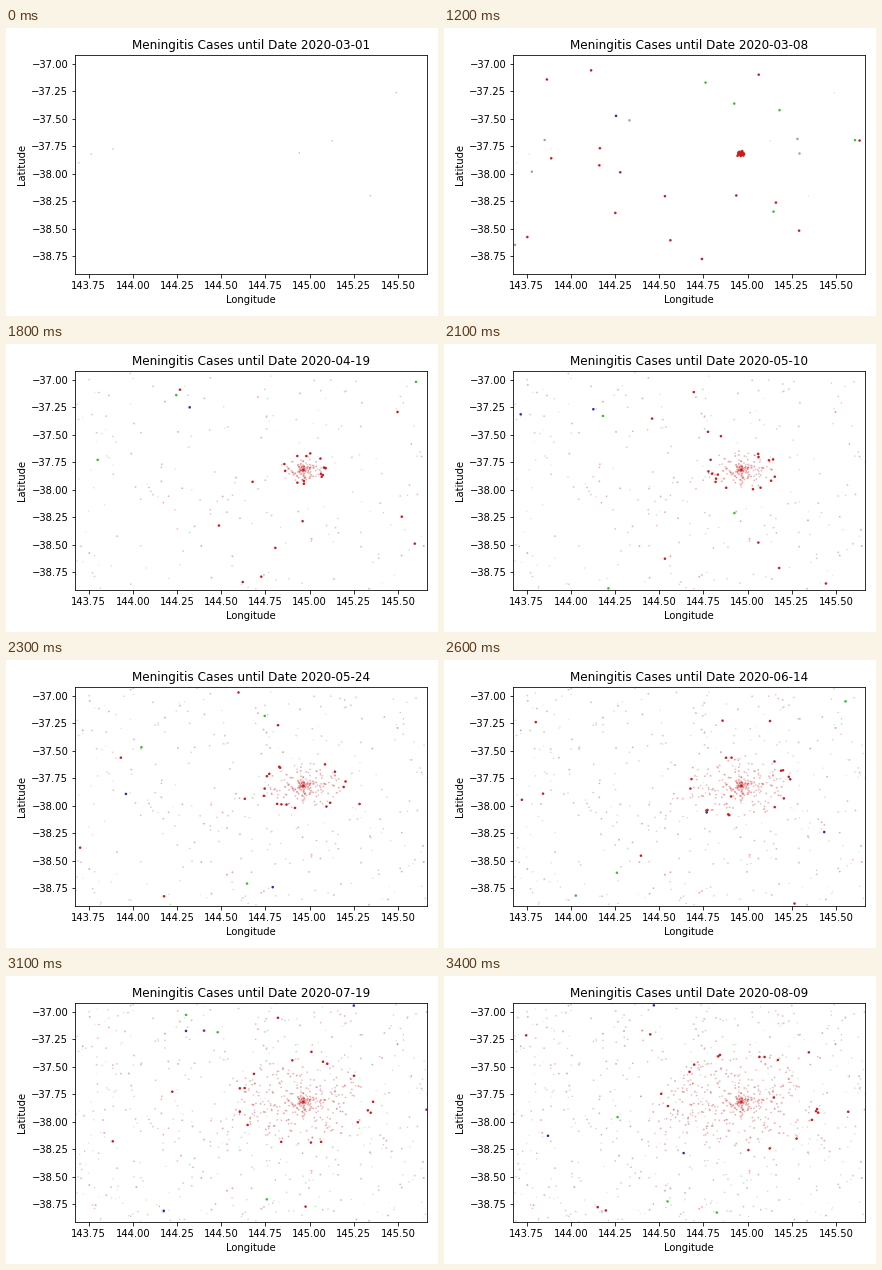
A matplotlib script that plays this animation: 432 px wide and 288 px high, repeating every 4.5 s.

```python
import numpy as np
import matplotlib.pyplot as plt
from matplotlib.animation import FuncAnimation
from matplotlib.colors import to_rgb

W, H, DPI = 432, 288, 72
LEFT, RIGHT, TOP, BOTTOM = 69.3, 421.2, 27.2, 246.2
LON = (143.675, 145.665)
LAT = (-38.914, -36.921)
CITY = (144.963, -37.817)
WEEKS, HOLD, FRAMES = 23, 11, 45
START = np.datetime64("2020-03-01")

RED, GREEN, BLUE, GREY = map(to_rgb, ("#cc1c20", "#34c234", "#2a2ab4", "#a4a4a4"))

# Size and opacity of a dot
BRIGHT, FADED, FAINT = (6.5, 1.0), (3.2, 0.32), (1.8, 0.28)

# Cases known at the start
FIRST = [(143.695, -37.90), (143.765, -37.82), (143.888, -37.775), (144.942, -37.81),
         (145.128, -37.70), (145.490, -37.262), (145.343, -38.20)]

rng = np.random.default_rng(20)
batches = []


def add(week, points, rgb, fresh=BRIGHT, old=FADED):
    n = len(points)
    vary = rng.uniform(0.75, 1.25, (n, 2))
    batches.append((np.full(n, week), points, np.tile(rgb, (n, 1)),
                    np.tile(fresh, (n, 1)), vary * old))


def scattered(n):
    return np.column_stack([rng.uniform(*LON, n), rng.uniform(*LAT, n)])


def ring(n, radius):
    angle = rng.uniform(0, 2 * np.pi, n)
    r = radius + rng.normal(0, 0.015, n)
    return np.column_stack([CITY[0] + r * np.cos(angle), CITY[1] + r * np.sin(angle)])


add(0, np.array(FIRST), to_rgb("#707070"), (1.6, 0.6), FAINT)

for week in range(1, WEEKS + 1):
    for rgb, n in ((GREY, 3), (RED, 2), (GREEN, 2), (BLUE, 2)):
        if week > 1:
            add(week, scattered(n), rgb, FAINT, FAINT)
    add(week, scattered(6 if week == 1 else 4), GREY, BRIGHT if week == 1 else FADED)
    add(week, scattered(max(8, 17 - week)), RED)
    add(week, ring(max(15, 29 - 2 * week), 0.02 * (week - 1)), RED)
    add(week, scattered(5 if week == 1 else 3), GREEN)
    add(week, scattered(1 + week // 10), BLUE)

week_of, pos, color, fresh_style, old_style = map(np.concatenate, zip(*batches))

fig = plt.figure(figsize=(W / DPI, H / DPI), dpi=DPI, facecolor="white")
ax = fig.add_axes([LEFT / W, 1 - BOTTOM / H, (RIGHT - LEFT) / W, (BOTTOM - TOP) / H])
ax.set(xlim=LON, ylim=LAT, xlabel="Longitude", ylabel="Latitude",
       xticks=np.arange(143.75, 145.51, 0.25), yticks=np.arange(-38.75, -36.99, 0.25))
ax.xaxis.set_major_formatter("{x:.2f}")
ax.yaxis.set_major_formatter("{x:.2f}")
title = ax.set_title("")
dots = ax.scatter([], [], linewidths=0)


def draw(frame):
    week = min(max(frame - HOLD, 0), WEEKS)
    seen = week_of <= week
    fresh = (week_of[seen] == week)[:, None]
    size, alpha = np.where(fresh, fresh_style[seen], old_style[seen]).T
    dots.set_offsets(pos[seen])
    dots.set_sizes(size)
    dots.set_facecolor(np.column_stack([color[seen], alpha]))
    title.set_text(f"Meningitis Cases until Date {START + 7 * week}")
    return dots, title


anim = FuncAnimation(fig, draw, frames=FRAMES, interval=100, repeat=True,
                     repeat_delay=0, init_func=lambda: draw(0))
plt.show()
```
